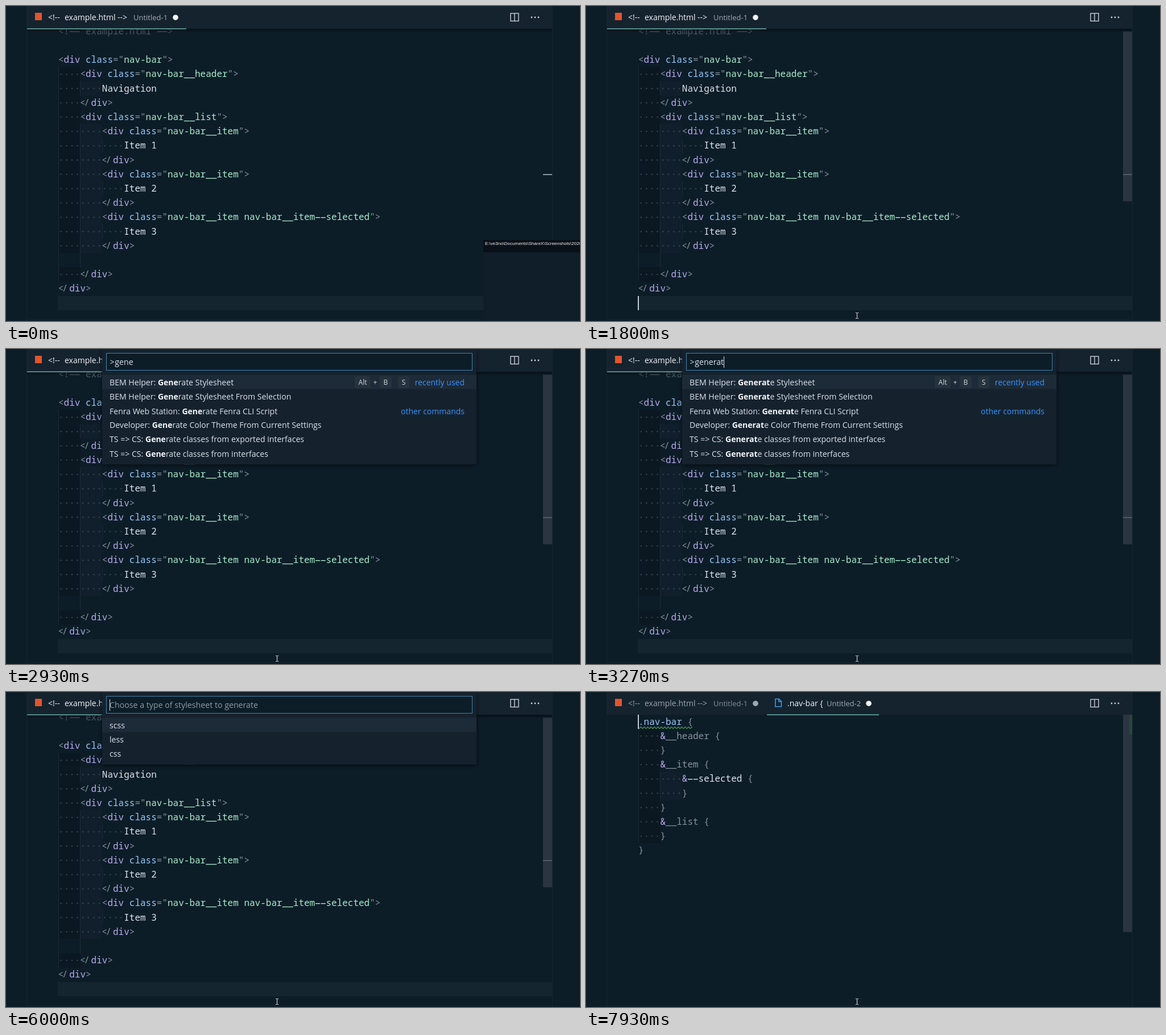
Animation, 1009 px wide and 555 px high, one loop 8 s. Source, as an HTML page with a canvas:

```html
<!DOCTYPE html>
<html lang="en">
<head>
<meta charset="utf-8">
<title>Generate stylesheet</title>
<style>
  html, body { margin: 0; width: 100%; height: 100%; overflow: hidden; background: #0d1d28; }
  canvas { display: block; }
</style>
</head>
<body>
<canvas id="stage" width="1009" height="555"></canvas>
<script>
const ctx = document.getElementById('stage').getContext('2d');
const LOOP = 8000, LINE = 25.2, CHAR = 9.6, LEFT = 92;
const UI = '"Open Sans", "Noto Sans", sans-serif';
const MONO = '16px "Noto Sans Mono", "DejaVu Sans Mono", monospace';
const INPUT_FONT = '14.2px ' + UI;
const C = {
  bg: '#0d1d28', bar: '#15232f', edge: '#152631', line: '#152530', guide: '#1c2c37',
  dot: '#33414c', punct: '#85929d', tag: '#b8abee', attr: '#98c9fa', str: '#a6edca',
  text: '#dce4ec', dim: '#85919b', comment: '#4c5a65', teal: '#62a59f',
  panel: '#15222e', row: '#1d2a38', key: '#26323d', link: '#3794ff'
};
const SHADES = ['#0b1822', '#101f2b', C.bg];

const html = `<!-- example.html -->

<div class="nav-bar">
    <div class="nav-bar__header">
        Navigation
    </div>
    <div class="nav-bar__list">
        <div class="nav-bar__item">
            Item 1
        </div>
        <div class="nav-bar__item">
            Item 2
        </div>
        <div class="nav-bar__item nav-bar__item--selected">
            Item 3
        </div>

    </div>
</div>`.split('\n');

const scss = `.nav-bar {
    &__header {
    }
    &__item {
        &--selected {
        }
    }
    &__list {
    }
}`.split('\n');

// Key chords: [label, left, right]; a plus sign has no box.
const chordMain = [['Alt', 613, 641], ['+', 645, 653], ['B', 657, 678], ['S', 689, 709]];
const first = { label: 'BEM Helper: Generate Stylesheet', keys: chordMain, note: 'recently used' };
const second = { label: 'BEM Helper: Generate Stylesheet From Selection' };
const listWide = [
  first,
  { label: 'Change Language Mode', keys: [['Ctrl', 701, 734], ['+', 737, 745], ['K', 749, 770], ['M', 781, 806]] },
  { label: 'Git: Merge Branch...' },
  { label: 'Move to Next Change' },
  { label: 'Git: Stage Selected Ranges', keys: [['Alt', 742, 771], ['+', 774, 782], ['S', 786, 806]] },
  { label: 'Git: Revert Selected Ranges' },
  second,
  { label: 'GitLens: Stash All Changes' }
];
const listNarrow = [
  first,
  second,
  { label: 'Fenra Web Station: Generate Fenra CLI Script', note: 'other commands', drop: 1 },
  { label: 'Developer: Generate Color Theme From Current Settings' },
  { label: 'TS => CS: Generate classes from exported interfaces' },
  { label: 'TS => CS: Generate classes from interfaces' }
];
const listTypes = ['scss', 'less', 'css'].map(label => ({ label }));

const QUERY = 'generate style';
const keyTimes = [2070, 2130, 2270, 2400, 3070, 3130, 3270, 3400, 3470, 3600, 3730, 3870, 3930, 4070];
const OPEN = 1870, CHOOSE = 4930, CLOSE = 6870, NEW_DOC = 6930;

const within = (t, a, b) => t >= a && t < b;
const clamp01 = v => Math.max(0, Math.min(1, v));

function rect(x, y, w, h, color) {
  ctx.fillStyle = color;
  ctx.fillRect(x, y, w, h);
}

function disc(x, y, r, color) {
  ctx.fillStyle = color;
  ctx.beginPath();
  ctx.arc(x, y, r, 0, 7);
  ctx.fill();
}

function label(str, x, y, color, font = '14px ' + UI, align = 'left') {
  ctx.font = font;
  ctx.fillStyle = color;
  ctx.textAlign = align;
  ctx.fillText(str, x, y);
  return ctx.measureText(str).width;
}

// Monospaced run on the character grid, with ligature-like "--" and "</".
function run(str, col, mid, color) {
  ctx.font = MONO;
  ctx.textAlign = 'left';
  ctx.fillStyle = color;
  const gap = color === C.comment ? 0 : 1.6;
  for (let i = 0; i < str.length; i++) {
    const x = LEFT + (col + i) * CHAR, pair = str.substr(i, 2);
    if (pair === '--') {
      const w = CHAR - 0.8 - gap / 2;
      ctx.fillRect(x + 0.8, mid + 0.2, w, 1.4);
      ctx.fillRect(x + 0.8 + w + gap, mid + 0.2, w, 1.4);
      i++;
    } else if (pair === '</') {
      ctx.fillText('<', x - 0.5, mid + 5.6);
      ctx.fillText('/', x + CHAR - 2.8, mid + 5.6);
      i++;
    } else ctx.fillText(str[i], x, mid + 5.6);
  }
}

function indent(n, mid) {
  for (let k = 0; k < n / 4; k++) {
    const x = LEFT + k * 4 * CHAR;
    rect(x, mid - LINE / 2, 4 * CHAR, LINE + 0.4, SHADES[k]);
    rect(Math.round(x), mid - LINE / 2, 1, LINE + 0.4, C.guide);
  }
  for (let i = 0; i < n; i++) disc(LEFT + (i + 0.5) * CHAR, mid + 0.4, 1.3, C.dot);
}

function htmlLine(src, mid) {
  const n = src.search(/\S|$/);
  indent(n, mid);
  let col = n, inTag = false, inStr = false;
  for (const tok of src.trim().match(/<!--.*|<\/?|>|="|"|div| class|[^<>="]+/g) || []) {
    let color = C.text;
    if (tok.startsWith('<!')) color = C.comment;
    else if (/^(<\/?|>|="|")$/.test(tok)) {
      color = C.punct;
      if (tok[0] === '<') inTag = true;
      if (tok === '>') inTag = false;
      if (tok.endsWith('"')) inStr = !inStr;
    } else if (inStr) color = C.str;
    else if (inTag) color = tok === 'div' ? C.tag : C.attr;
    run(tok, col, mid, color);
    col += tok.length;
  }
}

function scssLine(src, mid) {
  const n = src.search(/\S/);
  indent(n, mid);
  let col = n;
  for (const tok of src.trim().match(/\.[\w-]+|&|__\w+|--\w+| ?[{}]/g)) {
    const color = { '.': C.attr, '&': C.tag, '-': C.text }[tok[0]] || C.punct;
    run(tok, col, mid, color);
    col += tok.length;
  }
}

function scrollbar(y, h, alpha) {
  ctx.globalAlpha = alpha;
  rect(944, y, 16, h, '#2a3541');
  ctx.globalAlpha = 1;
}

function htmlDoc(t) {
  rect(91, 511, 869, 25, C.line);
  for (let k = 0; k < 2; k++) rect(Math.round(LEFT + k * 4 * CHAR), 435, 1, 26, C.guide);
  html.forEach((src, i) => htmlLine(src, 44.2 + LINE * i));
  const shown = clamp01((t - 70) / 400);
  scrollbar(45, 299, shown);
  ctx.globalAlpha = 1 - 0.6 * shown;
  rect(944, 296, 16, 2, '#8a959e');
  ctx.globalAlpha = 1;
  if (within(t, 670, 1130) || within(t, 1670, OPEN)) rect(91, 511, 2, 25, '#c3ccd4');
  const shade = ctx.createLinearGradient(0, 40, 0, 47);
  shade.addColorStop(0, 'rgba(0,0,0,.45)');
  shade.addColorStop(1, 'rgba(0,0,0,0)');
  rect(37, 40, 923, 7, shade);
}

function scssDoc(t) {
  scss.forEach((src, i) => scssLine(src, 52 + LINE * i));
  ctx.strokeStyle = '#4fa657';
  ctx.lineWidth = 1.2;
  ctx.beginPath();
  for (let x = 92; x <= 187; x++) ctx.lineTo(x, 63 + 1.4 * Math.sin((x - 92) * 1.05));
  ctx.stroke();
  scrollbar(40, 383, 1);
  rect(955, 41, 5, 34, '#25493c');
  if (!within(t, 7400, 7930)) rect(91, 40, 2, 25, '#c3ccd4');
}

function tabs(isNew) {
  rect(37, 0, 923, 40, C.bar);
  rect(51, 12, 12, 13, '#e2552b');
  const title = isNew ? '#99a4ad' : '#f2f5f7';
  label('<!--', 74, 25, title);
  label('example.html', 103, 25, title);
  label('-->', 196, 25, title);
  label('Untitled-1', 224, 25, isNew ? C.dim : '#a3adb5', '13px ' + UI);
  disc(298, 20.2, 4.8, isNew ? '#a0a9b0' : '#f2f4f5');
  if (isNew) {
    ctx.strokeStyle = '#3d9be0';
    ctx.lineWidth = 1.6;
    ctx.stroke(new Path2D('M332.8 12.2h6.4l4.2 4.4v9.2h-10.6zM338.8 12.4v4.6h4.6'));
    label('.nav-bar {', 354, 25, '#f2f5f7');
    label('Untitled-2', 423, 25, '#a3adb5', '13px ' + UI);
    disc(497, 20.2, 4.8, '#f2f4f5');
    rect(318, 39.4, 197, 1.6, C.teal);
  } else rect(36, 39.4, 281, 1.6, C.teal);
  ctx.strokeStyle = '#c9d0d6';
  ctx.lineWidth = 1.4;
  ctx.strokeRect(887, 13, 14, 13.5);
  ctx.beginPath();
  ctx.moveTo(894, 13);
  ctx.lineTo(894, 26.5);
  ctx.stroke();
  for (const x of [924, 930, 936]) disc(x, 20, 1.4, '#c9d0d6');
}

function matchLabel(str, query, x, y) {
  const at = query ? str.toLowerCase().indexOf(query) : -1;
  if (at < 0) return label(str, x, y, C.text, '14.1px ' + UI);
  const end = at + query.length;
  x += label(str.slice(0, at), x, y, C.text, '14.1px ' + UI);
  x += label(str.slice(at, end), x, y, '#f4f7f9', 'bold 14px ' + UI);
  label(str.slice(end), x, y, C.text, '14.1px ' + UI);
}

function keycaps(keys, mid) {
  for (const [name, x0, x1] of keys) {
    if (name !== '+') {
      ctx.fillStyle = C.key;
      ctx.beginPath();
      ctx.roundRect(x0, mid - 10.5, x1 - x0, 21, 3);
      ctx.fill();
    }
    label(name, (x0 + x1) / 2, mid + 4.4, '#d3dae0', '12px ' + UI, 'center');
  }
}

function palette(rows, query, caretOn, placeholder) {
  const bottom = 52 + LINE * rows.length;
  ctx.save();
  ctx.shadowColor = 'rgba(0,0,0,.6)';
  ctx.shadowBlur = 8;
  ctx.shadowOffsetY = 2;
  rect(169, 0, 658, bottom, C.panel);
  ctx.restore();
  rect(176, 7, 644, 31, C.bg);
  ctx.strokeStyle = '#4084b0';
  ctx.lineWidth = 1;
  ctx.strokeRect(176.5, 7.5, 643, 30);

  let caretX = 182;
  if (placeholder) label(placeholder, 182, 28.4, '#909ba4', INPUT_FONT);
  else {
    label('>', 182.5, 28.4, C.text, INPUT_FONT);
    caretX = Math.round(191.3 + label(query, 191.3, 28.4, C.text, INPUT_FONT));
  }
  if (caretOn) rect(caretX, 13, 1, 20, '#dfe5ea');

  rect(169, 45.5, 658, 25, C.row);
  rows.forEach((row, i) => {
    const mid = 58.5 + LINE * i, y = mid + 5 + (row.drop || 0);
    const key = query.trim();
    const hit = row.label.toLowerCase().includes(key) ? key : 'generate';
    matchLabel(row.label, key && hit, 182, y);
    if (row.keys) keycaps(row.keys, mid);
    if (row.note) label(row.note, 806, y, C.link, '14px ' + UI, 'right');
  });
  if (rows.length > 7) rect(816, 45.5, 10, 25, '#2e3a46');
}

function toast(t) {
  const alpha = 1 - clamp01((t - 70) / 460);
  if (!alpha) return;
  ctx.globalAlpha = alpha;
  rect(839, 412, 170, 143, '#0f1e29');
  rect(839, 412, 170, 22, '#0a1018');
  label('E:\\ve3no\\Documents\\ShareX\\Screenshots\\2020-08', 842, 421, '#f0f2f4',
    '8px "Liberation Sans", Arial, sans-serif');
  ctx.globalAlpha = 1;
}

function pointer(t) {
  if (t < 70) return;
  const left = Math.pow(1 - clamp01((t - 70) / 400), 3);
  ctx.strokeStyle = '#e6eaed';
  ctx.lineWidth = 1;
  ctx.save();
  ctx.translate(Math.round(476 + 520 * left) + 0.5, Math.round(545 - 50 * left) + 0.5);
  ctx.stroke(new Path2D('M-2.5 -5h2M0.5 -5h2M0 -4.5v9M-2.5 5h2M0.5 5h2'));
  ctx.restore();
}

function draw(t) {
  const isNew = t >= NEW_DOC;
  rect(0, 0, 1009, 555, C.bg);
  (isNew ? scssDoc : htmlDoc)(t);
  tabs(isNew);
  rect(36, 0, 1, 555, C.edge);
  rect(960, 0, 1, 555, C.edge);
  rect(37, 552, 923, 1, '#12232e');

  if (within(t, OPEN, CHOOSE)) {
    const typed = keyTimes.filter(k => t >= k).length;
    const rows = typed < 3 ? listWide : typed < 11 ? listNarrow : [first, second];
    const caretOn = !within(t, 2930, 3070) && t < 4600;
    palette(rows, QUERY.slice(0, typed), caretOn);
  } else if (within(t, CHOOSE, CLOSE)) {
    const caretOn = t < 5470 || within(t, 6000, 6530);
    palette(listTypes, '', caretOn, 'Choose a type of stylesheet to generate');
  }
  toast(t);
  pointer(t);
}

function frame() {
  draw(performance.now() % LOOP);
  requestAnimationFrame(frame);
}
frame();
</script>
</body>
</html>
```
